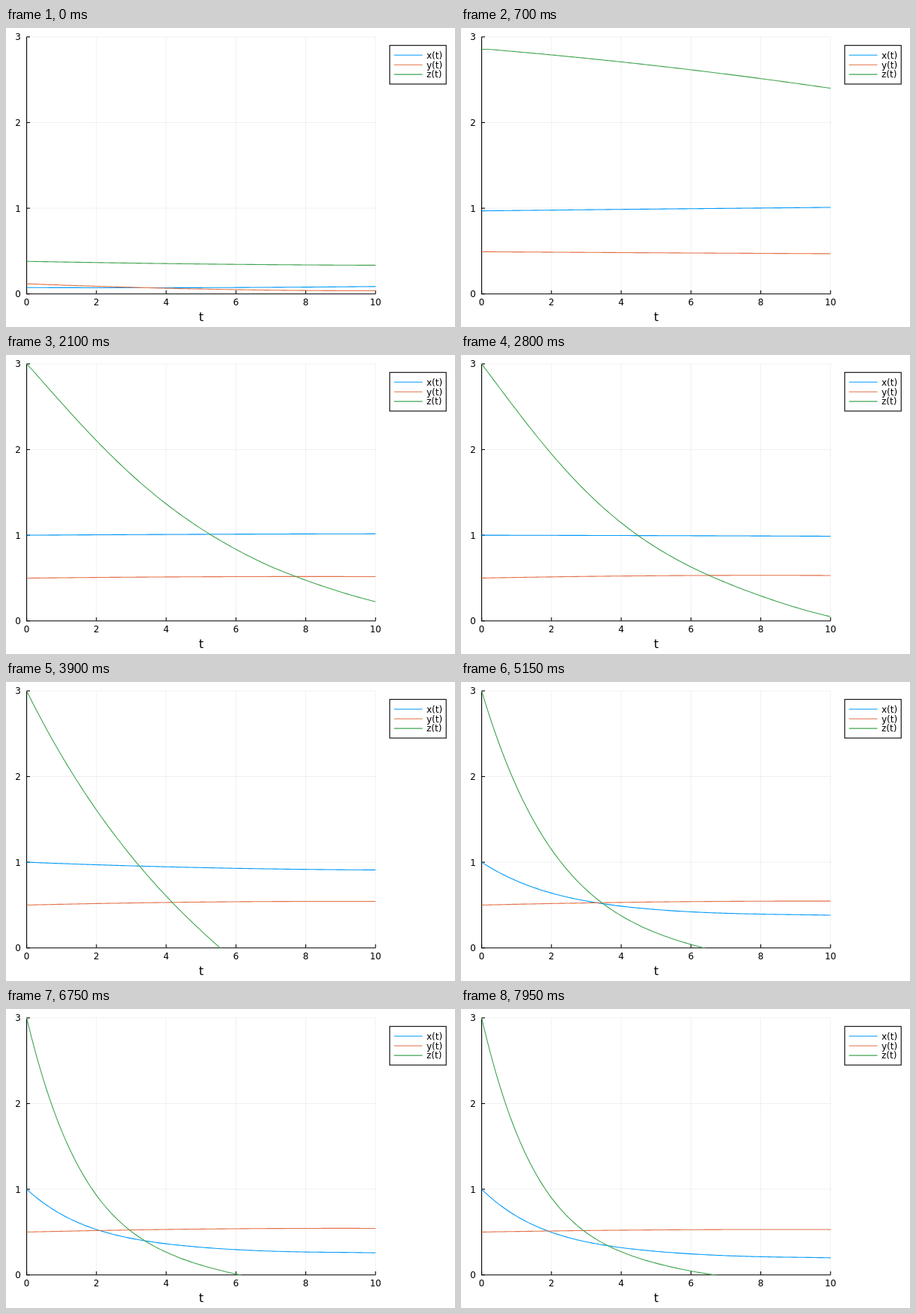
An HTML page for the animation above (8000 ms loop, 600 by 400 pixels).

```html
<!DOCTYPE html>
<html lang="en">
<head>
<meta charset="utf-8">
<title>x(t), y(t), z(t)</title>
<style>
  html, body { margin: 0; width: 100%; height: 100%; overflow: hidden; background: #fff; }
  svg { display: block; width: 600px; height: 400px; }
  text { font: 12px "DejaVu Sans", sans-serif; fill: #000; }
  .grid { stroke: #000; stroke-opacity: .1; stroke-width: .6; }
  .axis { stroke: #000; stroke-width: 1.1; fill: none; }
  .curve { fill: none; stroke-width: 1.1; stroke-linejoin: round; }
</style>
</head>
<body>
<svg id="plot" viewBox="0 0 600 400">
  <clipPath id="area"><rect x="27" y="11" width="467.2" height="345"/></clipPath>
</svg>
<script>
const LOOP = 8000, STEP = 50, SAMPLES = 120;
const plot = document.getElementById("plot");
const px = t => 27.6 + t * 46.62;
const py = v => 355.7 - v * 114.6;

// Each curve is given by values at evenly spaced t from 0 to 10.
const keys = [
  { at: 0, x: [.074, .073, .086], y: [.118, .057, .036], z: [.38, .349, .334] },
  { at: 400, x: [.85, .88, .9], y: [.47, .45, .44], z: [2.2, 2.15, 2.08] },
  { at: 850, x: [.99, 1.01, 1.03], y: [.495, .485, .475], z: [2.98, 2.75, 2.45] },
  { at: 1400, x: [1, 1.023, 1.044], y: [.495, .49, .483], z: [3.005, 2.62, 2.28, 2.035, 1.877, 1.778] },
  { at: 2350, x: [1, 1.005, 1.005], y: [.5, .522, .525], z: [3, 2, 1.2, .65, .27, -.01] },
  { at: 2800, x: [1, .995, .988], y: [.5, .527, .53], z: [3, 1.95, 1.145, .63, .292, .05] },
  { at: 3900, x: [1, .937, .91], y: [.5, .535, .542], z: [3, 1.61, .605, -.155, -.755, -1.255] },
  { at: 5150, x: [1, .64, .487, .421, .394, .381], y: [.5, .536, .546], z: [3, 1.15, .375, .04, -.13, -.23] },
  { at: 6750, x: [1, .53, .363, .295, .267, .257], y: [.5, .535, .543], z: [3, .93, .265, .01, -.11, -.18] },
  { at: 7950, x: [1, .497, .318, .245, .212, .199], y: [.5, .525, .529], z: [3, .9, .27, .045, -.055, -.11] }
];
const colors = { x: "#009afa", y: "#e36f47", z: "#3ea44e" };

function add(tag, attrs, text) {
  const el = document.createElementNS(plot.namespaceURI, tag);
  for (const name in attrs) el.setAttribute(name, attrs[name]);
  if (text) el.textContent = text;
  return plot.appendChild(el);
}

const path = (d, attrs) => add("path", { d, ...attrs });

// Lagrange polynomial through evenly spaced values, u from 0 to 1.
function polynomial(values, u) {
  const s = u * (values.length - 1);
  return values.reduce((sum, value, i) =>
    sum + values.reduce((term, _, j) => j === i ? term : term * (s - j) / (i - j), value), 0);
}

// Slope at key i that keeps the motion free of overshoot.
function slope(values, i) {
  if (i === 0 || i === keys.length - 1) {
    const a = i === 0 ? 0 : i - 1;
    return (values[a + 1] - values[a]) / (keys[a + 1].at - keys[a].at);
  }
  const before = (values[i] - values[i - 1]) / (keys[i].at - keys[i - 1].at);
  const after = (values[i + 1] - values[i]) / (keys[i + 1].at - keys[i].at);
  return before * after > 0 ? 2 * before * after / (before + after) : 0;
}

function tween(track, time) {
  const next = keys.findIndex(key => key.at > time);
  const i = next < 0 ? keys.length - 2 : next - 1;
  const span = keys[i + 1].at - keys[i].at;
  const p = (time - keys[i].at) / span, q = 1 - p;
  const { values, slopes } = track;
  return values[i] * q * q * (1 + 2 * p) + values[i + 1] * p * p * (3 - 2 * p)
    + span * p * q * (slopes[i] * q - slopes[i + 1] * p);
}

for (let i = 0; i <= 5; i++) {
  const x = px(i * 2);
  path(`M${x} 12V355.5`, { class: "grid" });
  path(`M${x} 355.5v-4.5`, { class: "axis" });
  add("text", { x, y: 371.3, "text-anchor": "middle" }, String(i * 2));
}
for (let v = 0; v <= 3; v++) {
  const y = py(v);
  path(`M27.5 ${y}H494`, { class: "grid" });
  path(`M27.5 ${y}h4.5`, { class: "axis" });
  add("text", { x: 20, y: y + 4.5, "text-anchor": "end" }, String(v));
}
path("M27.6 12V355.7H494", { class: "axis" });
add("text", { x: 261, y: 392, "text-anchor": "middle", style: "font-size:16px" }, "t");
add("rect", { x: 512.8, y: 23.3, width: 75.4, height: 51.7, class: "axis" });

const curves = Object.keys(colors).map((name, row) => {
  const y = 36.3 + row * 12.9, stroke = colors[name];
  path(`M518.5 ${y}H556.5`, { class: "curve", stroke });
  add("text", { x: 562, y: y + 4.3 }, `${name}(t)`);
  const tracks = Array.from({ length: SAMPLES + 1 }, (_, n) => {
    const values = keys.map(key => polynomial(key[name], n / SAMPLES));
    return { values, slopes: values.map((_, i) => slope(values, i)) };
  });
  return { tracks, line: path("", { class: "curve", stroke, "clip-path": "url(#area)" }) };
});

function draw(time) {
  for (const { tracks, line } of curves) {
    const points = tracks.map((track, n) =>
      `${px(n * 10 / SAMPLES).toFixed(2)} ${py(tween(track, time)).toFixed(2)}`);
    line.setAttribute("d", "M" + points.join("L"));
  }
}

const start = performance.now();
function frame() {
  const elapsed = (performance.now() - start) % LOOP;
  draw(Math.floor(elapsed / STEP) * STEP);
  requestAnimationFrame(frame);
}
frame();
</script>
</body>
</html>
```
